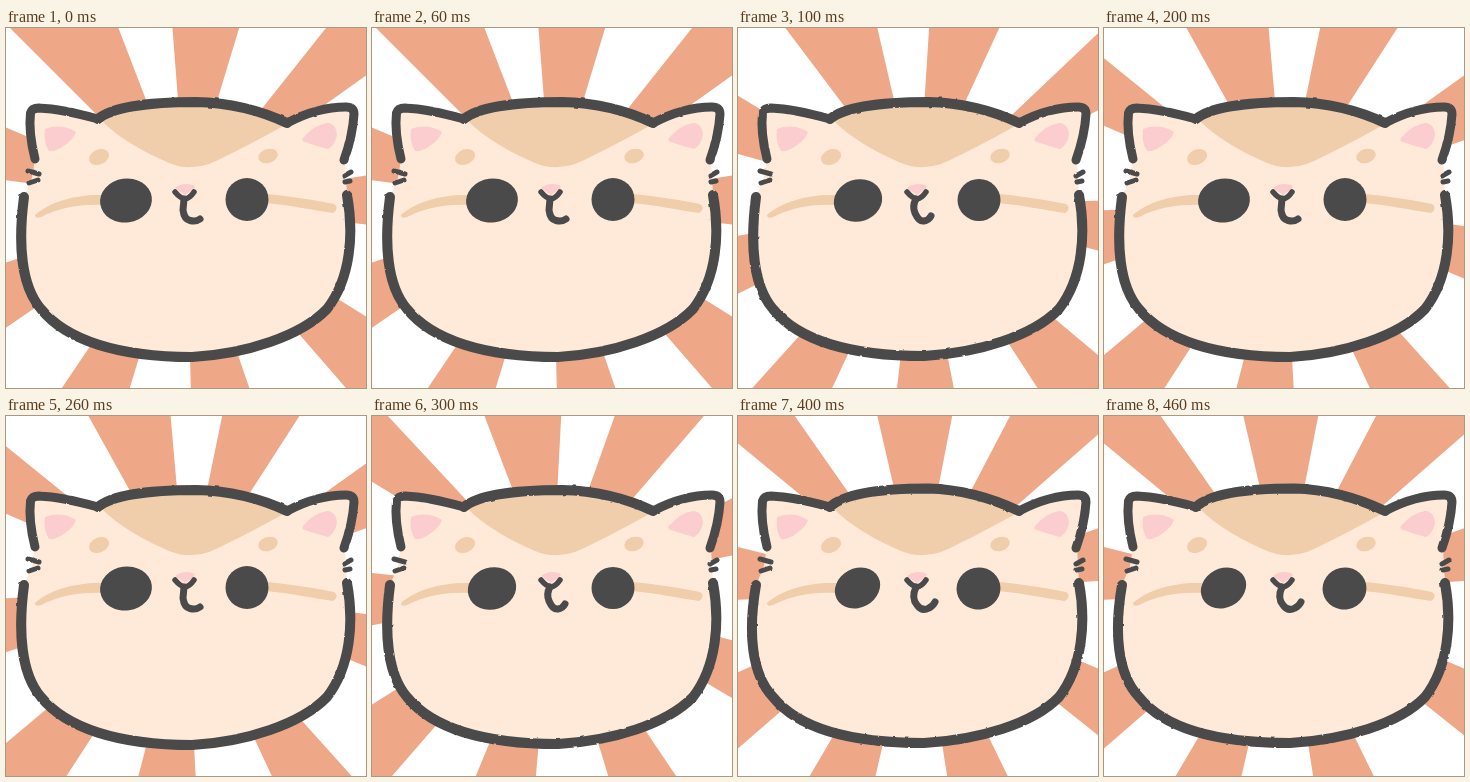
An HTML page for the animation above (0.5 s loop, 360 by 360 pixels).

```html
<!DOCTYPE html>
<html lang="en">
<head>
<meta charset="utf-8">
<title>Cat with turning rays</title>
<style>
  html, body { margin: 0; width: 100%; height: 100%; overflow: hidden; background: #fff; }
  svg { display: block; width: 100vw; height: 100vh; }
  .ink { fill: none; stroke: #4a4a4a; stroke-linecap: round; stroke-linejoin: round; }
  .dark { fill: #4a4a4a; }
  .tan { fill: #f0cdab; }
  .pink { fill: #fbcdce; }
</style>
</head>
<body>
<svg viewBox="0 0 360 360">
  <defs>
    <filter id="rough" x="-5%" y="-5%" width="110%" height="110%" color-interpolation-filters="sRGB">
      <feTurbulence id="noise" type="fractalNoise" baseFrequency="0.12" numOctaves="2" seed="1"/>
      <feDisplacementMap in="SourceGraphic" scale="2" xChannelSelector="R" yChannelSelector="G"/>
    </filter>
  </defs>

  <path id="rays" fill="#eea888"/>

  <path fill="#ffead9" d="M29 131 C25 115 23 98 24.5 85 Q26 80 33 80 C55 81 74 86 92 91
    C105 80 140 74 190 74 C230 75 262 86 281 95 C298 86 320 79 342 78 Q349 78 349 86
    C348 104 344 118 339 132 L340 150 L341 167 C348 205 345 250 321 281
    C295 308 240 325 186 328 C112 328 60 312 35 281 C15 258 12 215 18 169 L26 150 Z"/>

  <path class="tan" d="M94 91 C108 80 140 74 190 74 C230 75 262 86 281 96
    C250 113 224 127 203 136 Q182 143 163 135 C140 125 113 111 94 91 Z"/>
  <ellipse class="tan" cx="93" cy="129" rx="10.5" ry="7.5" transform="rotate(-24 93 129)"/>
  <ellipse class="tan" cx="262" cy="128" rx="10" ry="7" transform="rotate(-18 262 128)"/>
  <path class="tan" d="M29 187 C43 174 70 166 98 167 L97 177 C72 176 54 180 35 189 Q29 191 29 187 Z"/>
  <path class="tan" d="M260 166 C282 168 308 172 328 176 Q334 180 327 185 C306 182 284 177 260 175 Z"/>

  <path class="pink" d="M39 101 Q55 95 70 104 Q67 112 59 117 Q50 124 43 123 Q37 114 39 101 Z"/>
  <path class="pink" d="M297 110 Q308 97 321 95 Q330 95 331 107 Q329 117 322 121 Q310 118 299 114 Q295 113 297 110 Z"/>
  <path class="pink" d="M169 160 Q176 154 187 157 Q191 159 186 162 L179 167 Z"/>

  <g filter="url(#rough)">
    <path class="ink" id="head" stroke-width="10"/>
    <path class="ink" stroke-width="9" d="M29 131 C25 115 23 98 24.5 85 Q26 80 33 80 C55 81 74 86 92 91
      M281 95 C298 86 320 79 340 79 Q348 79 348 86 C347 104 343 118 338 132"/>
    <path class="ink" stroke-width="5" d="M22 143 L33 146 M23 155 L32 152 M338 148 L345 144 M339 154 L344 153"/>
  </g>

  <ellipse class="dark" id="eyeL"/>
  <ellipse class="dark" id="eyeR"/>
  <path class="ink" stroke-width="5.5" d="M169 164 Q174 170 179 171 Q184 170 188 164"/>
  <path class="ink" id="mouth" stroke-width="7"/>
</svg>

<script>
const STEP = 100, COUNT = 5, TURN = 8;
const $ = id => document.getElementById(id);
const rad = deg => deg * Math.PI / 180;

// Hand-cut rays: start and end angle, clockwise from straight up.
const rays = [
  [-45, -21], [-4.4, 16.8], [38.5, 54.5], [81, 96.5], [122, 139],
  [161, 178.5], [-163, -146], [-124.5, -108], [-82.5, -67],
];

// Eyes are [cx, cy, rx, ry, tilt]; top, low and side shift the outline.
const poses = [
  { eyeL: [120, 172.5, 26, 22, -8], eyeR: [241, 171.5, 21.5, 21.5, 0],
    mouth: 'M178 171 L177 182 Q178 191 184 192.5 Q190 194 194 191', top: 0, low: 1, side: 0 },
  { eyeL: [120, 172.5, 24.5, 21, -18], eyeR: [241, 172, 21.5, 21, 0],
    mouth: 'M178 171 Q174 178 177 185 Q181 194 186 193 Q191 192 193 188', top: 0, low: 0, side: 0 },
  { eyeL: [119.5, 172, 23.5, 19.5, -28], eyeR: [240.5, 172.5, 22, 21, -12],
    mouth: 'M178 171 Q173 182 179 189 Q184 196 191 192 Q195 190 197 186', top: -1.5, low: -1, side: -2 },
];
const order = [0, 1, 0, 1, 2];

const far = deg => `${180 + 400 * Math.sin(rad(deg))} ${176 - 400 * Math.cos(rad(deg))}`;
const rayPath = turn => rays.map(([a, b]) => `M180 176 L${far(a + turn)} L${far(b + turn)}Z`).join('');

function headPath({ top, low, side }) {
  return `M92 91 C105 ${80 + top} 140 ${74 + top} 190 ${74 + top} C230 ${75 + top} 262 86 281 95
    M18 169 C${12 + side} 215 ${15 + side} 258 35 281 C60 312 112 ${328 + low} 186 ${328 + low}
    C240 ${325 + low} 295 308 321 281 C345 250 348 205 341 167`;
}

function setEye(id, [cx, cy, rx, ry, tilt]) {
  const attrs = { cx, cy, rx, ry, transform: `rotate(${tilt} ${cx} ${cy})` };
  for (const name in attrs) $(id).setAttribute(name, attrs[name]);
}

function draw(step) {
  const pose = poses[order[step]];
  $('rays').setAttribute('d', rayPath(step * TURN));
  $('head').setAttribute('d', headPath(pose));
  $('mouth').setAttribute('d', pose.mouth);
  $('noise').setAttribute('seed', order[step] + 1);
  setEye('eyeL', pose.eyeL);
  setEye('eyeR', pose.eyeR);
}

let shown = -1;
function tick() {
  const step = Math.floor(performance.now() / STEP) % COUNT;
  if (step !== shown) draw(shown = step);
  requestAnimationFrame(tick);
}
tick();
</script>
</body>
</html>
```
